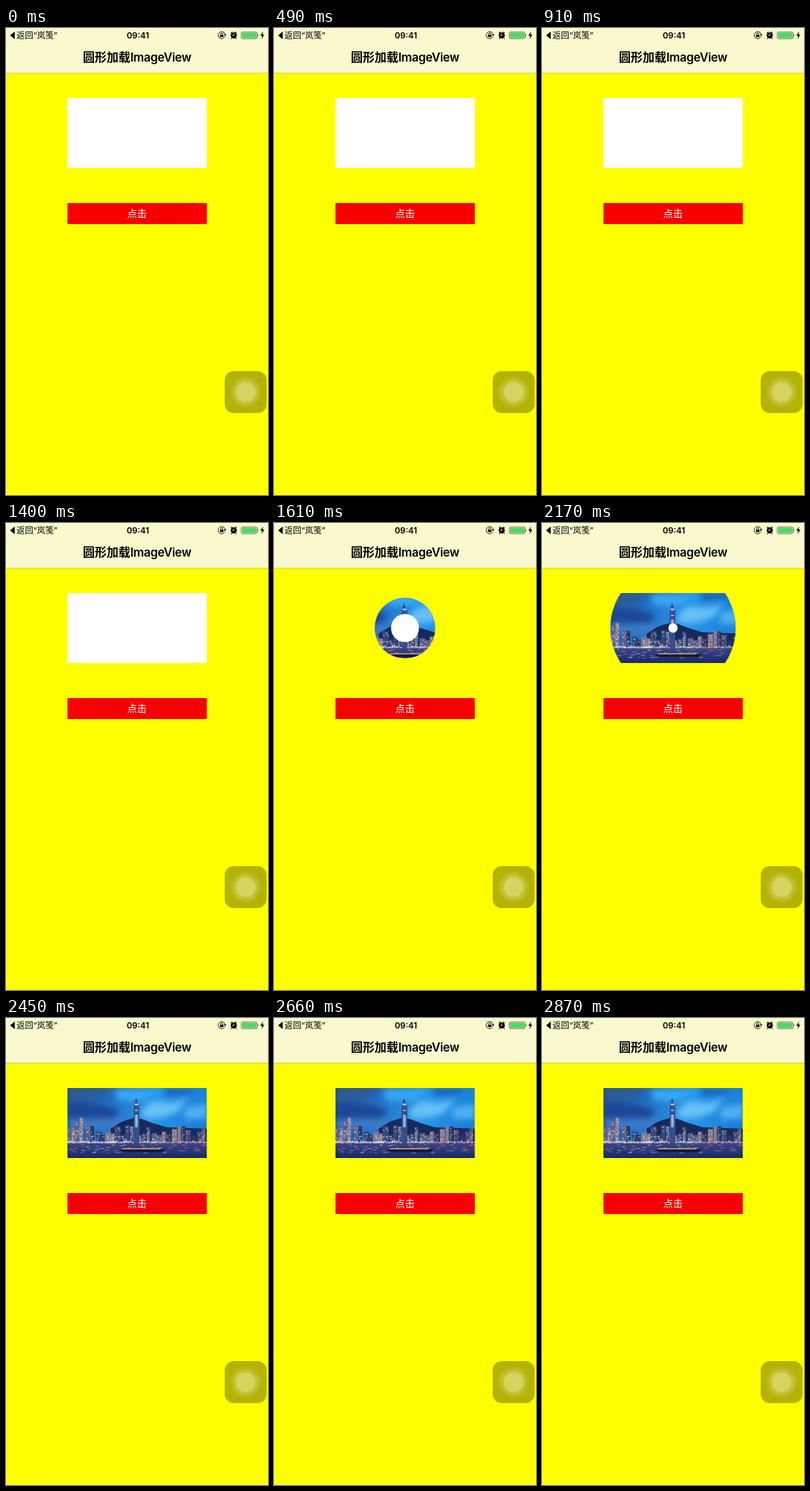
An HTML page that plays this animation: 375x667 px, repeating every 3010 ms.

```html
<!DOCTYPE html>
<html lang="zh">
<head>
<meta charset="utf-8">
<style>
  html, body { margin: 0; width: 100%; height: 100%; overflow: hidden; background: #ff0; }
  svg { display: block; }
  text { font-family: Inter, "Noto Sans CJK SC", "Noto Sans CJK", sans-serif; }
</style>
</head>
<body>
<svg width="100%" height="100%" viewBox="0 0 375 667">
  <defs>
    <linearGradient id="sky" x2="1" y2=".15">
      <stop offset="0" stop-color="#1d4c94"/>
      <stop offset=".35" stop-color="#2272c8"/>
      <stop offset=".65" stop-color="#2698ec"/>
      <stop offset="1" stop-color="#1b80d6"/>
    </linearGradient>
    <linearGradient id="water" x2="0" y2="1">
      <stop offset="0" stop-color="#3c4486"/>
      <stop offset="1" stop-color="#172a66"/>
    </linearGradient>
    <filter id="soft" x="-50%" y="-50%" width="200%" height="200%"><feGaussianBlur stdDeviation="4"/></filter>
    <clipPath id="reveal"><circle id="outer" cx="187.5" cy="150"/></clipPath>
  </defs>

  <rect width="375" height="667" fill="#ff0"/>
  <rect width="375" height="64" fill="#f9f9cd"/>
  <rect y="64" width="375" height=".6" fill="#b5b56a"/>

  <!-- status bar -->
  <path d="M6 10.5l6.5-5.5v11z"/>
  <text x="15" y="14.5" font-size="12">返回“岚笺”</text>
  <text x="188.7" y="14.6" font-size="12" font-weight="600" text-anchor="middle">09:41</text>
  <g fill="none" stroke="#111">
    <path d="M313.2 12.6A5 5 0 1 1 313.7 9.5"/>
    <path d="M307.3 10V8.7a1.5 1.5 0 0 1 3 0V10"/>
    <path d="M322 7.2l2-1.7M330 7.2l-2-1.7M323 14.5l-1 1M329 14.5l1 1" stroke-width="1.3"/>
  </g>
  <path d="M306.4 9.7h4.8v3.4h-4.8zM311.6 9.2h3.8l-1.9 2.5z"/>
  <circle cx="326" cy="10.6" r="4.4"/>
  <path d="M326 8v2.8h-2.2" fill="none" stroke="#f9f9cd" stroke-width=".9"/>
  <rect x="336.8" y="5.8" width="22.6" height="9.4" rx="1.8" fill="none" stroke="#333" stroke-width=".7"/>
  <rect x="337.8" y="6.8" width="20.6" height="7.4" rx=".8" fill="#4cd964"/>
  <path d="M360.2 8.8q1.5 1.7 0 3.4z"/>
  <path d="M368 5l-4 6h2.6l-1 4.7 4.2-6.2h-2.7z"/>

  <text x="110" y="48.4" font-size="17" font-weight="600">圆形加载<tspan letter-spacing="-.35">ImageView</tspan></text>

  <!-- image view -->
  <rect id="blank" x="88" y="100" width="199.500" height="100" fill="#fff"/>
  <g id="picture" clip-path="url(#reveal)">
    <svg x="88" y="100" width="199.500" height="100" viewBox="0 0 200 100" preserveAspectRatio="none">
      <rect width="200" height="100" fill="url(#sky)"/>
      <g filter="url(#soft)">
        <path d="M0 0h70q-20 16-70 18z" fill="#2f5c90"/>
        <path d="M0 24q40-6 75 8l-10 12q-30-4-65 0z" fill="#1c4796"/>
        <path d="M70 2h60l-16 14q-20 6-44 0z" fill="#38a8f2"/>
        <path d="M106 34q10-18 30-14t36-6l-14 20q-26 12-52 8z" fill="#66c0f6"/>
        <path d="M140 0h46l-10 9-36 3z" fill="#1c62b2"/>
        <path d="M168 28l32-6v22h-32z" fill="#4fb0f0"/>
        <path d="M0 46h92v12H0z" fill="#3f7cc6"/>
      </g>
      <path d="M62 58l16-10 16-5 12 1 16 6 20 6 58 2v22H62z" fill="#172a5c"/>
      <g id="city"></g>
      <path d="M95 80V24l1.500-4 1.500-5h1l1.500 5 2.500 4v56z" fill="#34508c"/>
      <path d="M96 22h6v3h-6zM97 31h4v2h-4zM97 38h4v18h-4z" fill="#8fb0dc"/>
      <rect y="79" width="200" height="21" fill="url(#water)"/>
      <g id="glints"></g>
      <path d="M73 87.500h61l7-1-5 5H79z" fill="#111a3c"/>
      <path d="M78 86h55v1.500H78z" fill="#d6a36a"/>
    </svg>
  </g>
  <circle id="hole" cx="187.5" cy="150" fill="#fff"/>

  <rect x="88" y="250" width="199.500" height="30" fill="#f60000"/>
  <text x="187.5" y="270.2" font-size="14" fill="#fff" text-anchor="middle">点击</text>

  <!-- floating button -->
  <rect x="313" y="490" width="60" height="60" rx="13" fill="#b4b303"/>
  <circle cx="343" cy="520" r="22" fill="#bbba1b"/>
  <circle cx="343" cy="520" r="18" fill="#c4c337"/>
  <circle cx="343" cy="520" r="14" fill="#d5d45f"/>
</svg>

<script>
const $ = id => document.getElementById(id);
const LOOP = 3010, STEP = 70, START = 1400, DURATION = 1050;

let seed = 7;
const random = () => (seed = seed * 16807 % 2147483647) / 2147483647;
const pick = list => list[Math.floor(random() * list.length)];
const rect = (x, y, w, h, fill, opacity = 1) =>
  `<rect x="${x}" y="${y}" width="${w}" height="${h}" fill="${fill}" opacity="${opacity}"/>`;

// Pale lights on the left shore, redder ones on the right.
const light = x => pick(x < 130
  ? ['#fff2d8', '#ffe0b0', '#f4efe8', '#d8b0c0', '#a8c8f0']
  : ['#ffd0a0', '#f09080', '#e05040', '#d0a0c0', '#90b8f0']);

function buildPhoto() {
  let city = '', glints = '';
  for (let x = 0; x < 200; x += 5 + random() * 4) {
    const width = 5 + random() * 4;
    const top = (x < 40 ? 42 : 52) + random() * 16;
    city += rect(x, top, width, 80 - top, pick(['#37487c', '#565f8c', '#807890', '#26386c']));
    for (let y = top + 2; y < 78; y += 3)
      for (let dx = 1; dx < width - 1; dx += 2)
        if (random() < .5) city += rect(x + dx, y, 1.4, 1.8, light(x), .85);
  }
  for (let x = 0; x < 200; x += 2) city += rect(x, 75 + random() * 2, 1.5, 3, light(x), .85);
  for (let i = 0; i < 70; i++) {
    const x = random() * 200;
    glints += rect(x, 80 + random() * 13, 2 + random() * 5, 1, light(x), .45);
  }
  $('city').innerHTML = city;
  $('glints').innerHTML = glints;
}

function draw(now) {
  const time = Math.floor(now % LOOP / STEP) * STEP;
  const progress = Math.min((time - START) / DURATION, 1);
  const revealing = progress > 0;
  $('blank').style.display = revealing ? 'none' : '';
  $('picture').style.display = revealing ? '' : 'none';
  $('outer').setAttribute('r', revealing ? 26 + 86.8 * progress : 0);
  $('hole').setAttribute('r', revealing ? 25 * (1 - progress) : 0);
}

buildPhoto();
const origin = performance.now();
function tick() {
  draw(performance.now() - origin);
  requestAnimationFrame(tick);
}
tick();
</script>
</body>
</html>
```
